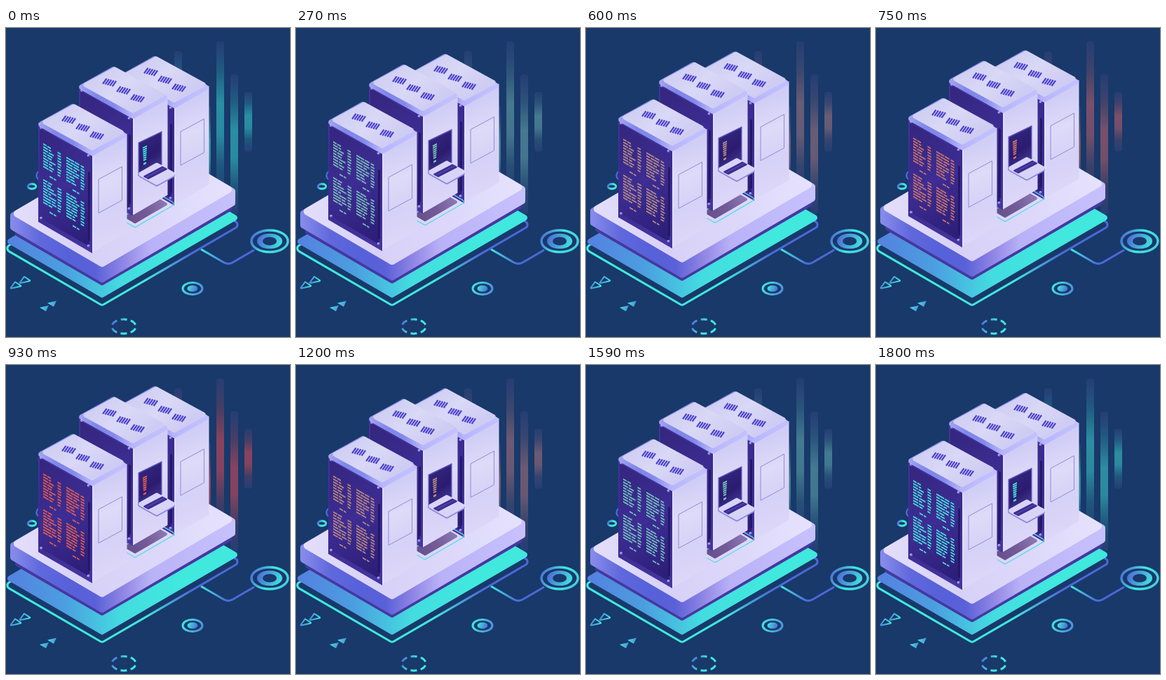
Write an HTML page with a canvas that moves like this. It is 405 by 440 pixels and loops after 1830 ms.

```html
<!DOCTYPE html>
<html lang="en">
<head>
<meta charset="utf-8">
<title>Server status</title>
<style>
html, body { margin: 0; width: 100%; height: 100%; overflow: hidden; background: #18396a; }
canvas { display: block; width: 405px; height: 440px; }
</style>
</head>
<body>
<canvas id="stage"></canvas>
<script>
const W = 405, H = 440, LOOP = 1830, STEP = 30, LIFT = 10, ISO = 0.58;
const SKY = '#18396a', TEAL = '#40e8de', BLUE = '#4c68d8', AZURE = '#4b8cdc';
const ratio = window.devicePixelRatio || 1;
const cv = document.getElementById('stage');
cv.width = W * ratio;
cv.height = H * ratio;
const c = cv.getContext('2d');

// Colours are blended through evenly spaced key colours
function blend(keys, p) {
  const at = p * (keys.length - 1);
  const i = Math.min(Math.floor(at), keys.length - 2);
  return keys[i].map((v, n) => Math.round(v + (keys[i + 1][n] - v) * (at - i)));
}
const TEXT = [[64, 230, 222], [160, 166, 155], [229, 90, 76]];
const BEAM = [[54, 205, 205], [222, 72, 84]];
const rgba = (v, a = 1) => `rgba(${v.join()},${a})`;

function random(seed) {
  return () => (seed = (seed * 16807) % 2147483647) / 2147483647;
}

// Evenly spaced stops from one point to another
function lin(x0, y0, x1, y1, ...cols) {
  const g = c.createLinearGradient(x0, y0, x1, y1);
  cols.forEach((col, i) => g.addColorStop(i / (cols.length - 1), col));
  return g;
}

// Floor shape given by its front corner and its reach to the left and right
function diamond(x, y, left, right, slope = ISO) {
  return [[0, 0], [left, 0], [left, right], [0, right]]
    .map(([u, v]) => [x - u + v, y - slope * (u + v)]);
}

// Upright panel given by its top left corner
function wall(x, y, w, h, slope) {
  return [[x, y], [x + w, y + w * slope], [x + w, y + w * slope + h], [x, y + h]];
}

function poly(pts, r = 0) {
  const n = pts.length, last = pts[n - 1], first = pts[0];
  c.beginPath();
  c.moveTo((last[0] + first[0]) / 2, (last[1] + first[1]) / 2);
  pts.forEach((p, i) => {
    const q = pts[(i + 1) % n];
    if (r) c.arcTo(p[0], p[1], q[0], q[1], r);
    else c.lineTo(p[0], p[1]);
  });
  c.closePath();
}

function fill(pts, style, r) {
  poly(pts, r);
  c.fillStyle = style;
  c.fill();
}

function stroke(style, width) {
  c.strokeStyle = style;
  c.lineWidth = width;
  c.stroke();
}

function outline(pts, style, width, r) {
  poly(pts, r);
  stroke(style, width);
}

function line(x0, y0, x1, y1, style, width) {
  c.beginPath();
  c.moveTo(x0, y0);
  c.lineTo(x1, y1);
  stroke(style, width);
}

function oval(x, y, r, squash = 0.6) {
  c.beginPath();
  c.ellipse(x, y, r, r * squash, 0, 0, Math.PI * 2);
}

function ring(x, y, r, width, ...cols) {
  oval(x, y, r);
  stroke(lin(x - r, y - r * 0.5, x + r, y + r * 0.5, ...cols), width);
}

function disc(x, y, r, style, squash) {
  oval(x, y, r, squash);
  c.fillStyle = style;
  c.fill();
}

function beam(x, top, bottom, col) {
  const dim = 'rgba(92,80,160,0.2)';
  c.fillStyle = lin(0, top, 0, bottom, dim, rgba(col, 0.25), rgba(col, 0.58),
    rgba(col, 0.55), rgba(col, 0.2), dim);
  c.beginPath();
  c.roundRect(x, top, 11, bottom - top, 4);
  c.fill();
}

function beams(col) {
  beam(240, 33, 210, col);
  beam(281, 110, 235, col);
  beam(300, 19, 240, col);
  beam(320, 66, 265, col);
  beam(340, 91, 176, col);
}

function ornaments() {
  ring(376, 303.5, 26, 3.5, BLUE, TEAL, '#45c8dc');
  disc(376, 303.5, 18, lin(358, 296, 394, 311, BLUE, TEAL));
  disc(376, 303.5, 10, SKY);
  ring(266, 371, 14, 3, TEAL, AZURE);
  disc(266, 371, 7.5, lin(259, 368, 273, 374, TEAL, BLUE));
  ring(37, 225.5, 5.8, 2.8, BLUE, TEAL, TEAL);
  oval(49, 210, 5.5, 1.1);
  stroke(BLUE, 2.4);

  for (const [x, y] of [[14, 366], [27, 358.5]]) {
    outline([[x - 1, y - 4.5], [x + 8, y + 1.5], [x - 8, y + 5]],
      lin(x - 8, y, x + 8, y, AZURE, TEAL), 2, 0.5);
  }
  for (const [x, y] of [[48, 398], [59, 391.5]]) {
    fill([[x, y], [x + 13, y - 3], [x + 9, y + 5.5]], lin(x, y, x + 13, y, TEAL, AZURE));
  }

  c.save();
  c.setLineDash([9, 5.4]);
  c.lineDashOffset = 11.7;
  ring(168, 425, 17, 3, BLUE, TEAL, TEAL);
  c.restore();
}

function base() {
  c.beginPath();
  c.moveTo(278, 315);
  c.arcTo(317, 337.5, 354, 316, 13);
  c.lineTo(354, 316);
  stroke(lin(278, 0, 354, 0, TEAL, BLUE, BLUE), 3);
  outline(diamond(137, 395, 140, 198), lin(0, 0, 331, 0, TEAL, TEAL, TEAL, TEAL, BLUE, BLUE), 3, 5);
  fill(diamond(137, 384.5, 139, 197), lin(0, 0, 330, 0, '#5580e0', '#4b9ee0', '#43dce0', TEAL, TEAL), 4);
}

function slab() {
  const left = 131, right = 190, front = 341;
  fill(diamond(137, front + 26, left - 3, right), '#45389f', 4);
  const side = lin(10, 0, 322, 0, '#858aea', '#6068dc', '#5761d9', '#5a60d8',
    '#8e84e4', '#b8b1f7', '#bdb7f9', '#c2bcfb', '#c6c1fc');
  const top = diamond(137, front, left, right, 0.585);
  const under = top.map(([x, y]) => [x, y + 22]);
  fill([under[0], under[1], top[1], top[2], top[3], under[3]], side, 4);
  fill(top, lin(10, 260, 322, 230, '#e4defb', '#d8d1f7', '#ddd8fa', '#e6e2fd'), 5);
}

function bolt(x, y) {
  disc(x, y, 1.8, '#b9b1f2', 1);
  disc(x + 0.4, y + 0.5, 0.9, '#6f63c4', 1);
}

function vents() {
  for (let g = 0; g < 3; g++) {
    for (let i = 0; i < 5; i++) {
      const x = 80 + g * 20 + i * 3.4, y = 132.5 + g * 11.3 + i * 0.9;
      line(x, y, x + 5.5, y - 7.6, '#4b40d0', 2.2);
    }
  }
}

function server(dx, dy, details) {
  c.save();
  c.translate(dx, dy);
  fill(wall(46, 135, 77, 141, ISO), lin(46, 140, 123, 310, '#43349f', '#392a90', '#45359f'));
  fill(wall(48, 142, 71, 128, ISO), lin(48, 150, 119, 300, '#35267f', '#3d2d94', '#2d1e78'));
  fill(wall(117, 204, 3, 98, ISO), '#241866');
  fill(wall(123, 179, 49.5, 140.5, -ISO),
    lin(123, 180, 168, 300, '#d0cdf6', '#dedaf8', '#d6d1f6', '#ddd7f9'));
  line(124, 181, 124, 318, '#e6e2ff', 1.2);
  fill(diamond(123, 182.5, 81, 53, 0.56),
    lin(46, 0, 172, 0, '#a2a6f0', '#7f86ea', '#838aeb', '#b6b4fc', '#c0bdfe', '#c3c0ff'), 4);
  fill(diamond(123, 174.5, 74, 48, 0.545),
    lin(75, 110, 130, 172, '#cfcdf2', '#dad8f6', '#cfccf3'), 3);
  vents();
  for (const drop of [0, 128.5]) {
    bolt(50, 142 + drop);
    bolt(117.5, 181.5 + drop);
  }
  details();
  c.restore();
}

function hatch() {
  outline(wall(132, 215.5, 33.5, 48, -0.54), '#918ad6', 1);
}

function readout(col) {
  const rnd = random(11);
  c.save();
  c.transform(1, ISO, 0, 1, 46, 134);
  c.fillStyle = rgba(col);
  for (const u of [7, 40]) {
    for (const v of [26, 77]) {
      for (let row = 0; row < 9; row++) {
        const y = v + row * 4, w = 10 + rnd() * 8, cut = w * (0.3 + rnd() * 0.4);
        c.fillRect(u, y, cut, 2);
        c.fillRect(u + cut + 1, y, w - cut, 2);
        c.fillRect(u + 20.5, y, 4 + rnd() * 2, 2);
      }
      c.fillRect(u + 9, v + 41, 5, 2);
      c.fillRect(u + 15, v + 41, 3.5, 2);
    }
  }
  c.restore();
}

// Screen and fold-out keyboard
function terminal(col) {
  fill(wall(188.5, 163, 34, 48, -0.48), '#5a4db4');
  fill(wall(190, 164, 31, 45, -0.48), lin(190, 160, 221, 205, '#33247f', '#2b1c70', '#4c3d9c'));
  c.save();
  c.transform(1, -0.5, 0, 1, 195, 169);
  c.fillStyle = rgba(col);
  for (let i = 0; i < 7; i++) c.fillRect(i * 0.15, i * 3 + 1, 6 - i * 0.3, 2.1);
  c.fillRect(1, 24, 4, 2.8);
  c.restore();
  fill(diamond(215, 226, 29, 29, 0.56), '#8d86dc', 3);
  fill(diamond(215, 224, 29, 29, 0.56), '#d8d4f8', 3);
  fill(diamond(203, 215.5, 8, 28, 0.52), '#3c2d92', 1);
  line(200, 212.5, 227, 198.5, '#7468c4', 0.7);
}

function floorMark() {
  fill(diamond(184, 278.5, 22, 48), lin(172, 276, 230, 248, '#65508c', '#735b96', '#8d7bb6'), 2);
  outline(diamond(184, 284, 22, 58), '#55dce6', 1.3, 3);
}

function draw(level) {
  c.setTransform(ratio, 0, 0, ratio, 0, 0);
  c.fillStyle = SKY;
  c.fillRect(0, 0, W, H);
  const col = blend(TEXT, level);
  beams(blend(BEAM, level));
  ornaments();
  base();
  c.translate(0, -LIFT * level);
  slab();
  server(117, -68, hatch);
  floorMark();
  server(58, -53, () => {});
  terminal(col);
  server(0, 0, () => { hatch(); readout(col); });
}

function tick(now) {
  const t = Math.floor((now % LOOP) / STEP) * STEP;
  draw(1 - Math.abs(1 - 2 * t / LOOP));
  requestAnimationFrame(tick);
}

draw(0);
requestAnimationFrame(tick);
</script>
</body>
</html>
```
